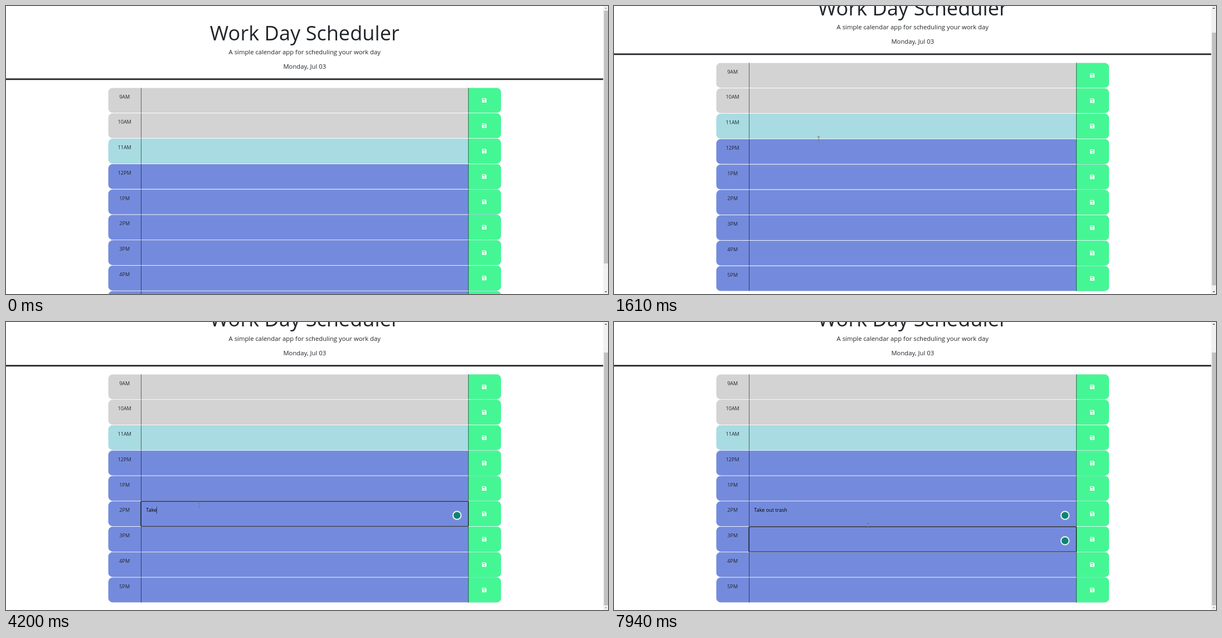
Write an HTML page with a canvas that moves like this. It is 1080 px wide and 519 px high and loops after 8 s.

```html
<!DOCTYPE html>
<html lang="en">
<head>
<meta charset="utf-8">
<title>Work Day Scheduler</title>
<style>
  html, body { margin: 0; width: 100%; height: 100%; overflow: hidden; background: #fff; }
  canvas { display: block; }
</style>
</head>
<body>
<canvas id="stage" width="1080" height="519"></canvas>
<script>
const ctx = document.getElementById('stage').getContext('2d');

// The page is laid out 1912 pixels wide and scaled down to the stage
const PAGE_WIDTH = 1912, SCALE = 1080 / PAGE_WIDTH, VIEW_HEIGHT = 519 / SCALE;
const LOOP = 8000, MAX_SCROLL = 94;
const BAR = 15, BAR_X = PAGE_WIDTH - BAR, CENTER = BAR_X / 2;

const INK = '#212529', GREEN = '#45f794';
const PAST = '#d3d3d3', PRESENT = '#a8dce2', FUTURE = '#748bdd';

const HOURS = ['9AM', '10AM', '11AM', '12PM', '1PM', '2PM', '3PM', '4PM', '5PM'];
const GRID_TOP = 261, GRID_WIDTH = 1248, ROW_HEIGHT = 80;
const LEFT = CENTER - GRID_WIDTH / 2, COLUMN = GRID_WIDTH / 12;
const FIELD_X = LEFT + COLUMN, BUTTON_X = LEFT + 11 * COLUMN;
const TEXT_X = FIELD_X + 16.5, BASELINE = 34;

const ENTRY = 'Take out trash';
const FIRST_KEY = 3580, KEY_GAP = 180;
const FIRST_FOCUS = 3170, SECOND_FOCUS = 7170, BLINK = 530;

// The pointer glides to each stop: departure time, x, y
const GLIDE = 350;
const STOPS = [
  [300, 1055, 424], [980, 657, 425], [1400, 645, 425], [2200, 548, 549],
  [2550, 513, 625], [2960, 613, 585], [6680, 806, 699], [7240, 806, 649]
];

const progress = (t, start, duration) => Math.min(1, Math.max(0, (t - start) / duration));
const smooth = p => p * p * (3 - 2 * p);
const rowY = index => GRID_TOP + index * (ROW_HEIGHT + 1);

function rect(x, y, w, h, color) {
  ctx.fillStyle = color;
  ctx.fillRect(x, y, w, h);
}

function circle(x, y, r, color) {
  ctx.fillStyle = color;
  ctx.beginPath();
  ctx.arc(x, y, r, 0, 7);
  ctx.fill();
}

function polygon(color, ...points) {
  ctx.fillStyle = color;
  ctx.beginPath();
  points.forEach(([x, y]) => ctx.lineTo(x, y));
  ctx.closePath();
  ctx.fill();
}

function text(str, x, y, size, align = 'center', color = INK) {
  ctx.font = `${size}px "Open Sans", sans-serif`;
  ctx.textAlign = align;
  ctx.fillStyle = color;
  ctx.fillText(str, x, y);
}

function drawHeader() {
  text('Work Day Scheduler', CENTER, 109, 64);
  text('A simple calendar app for scheduling your work day', CENTER, 153.5, 20);
  text('Monday, Jul 03', CENTER, 199.5, 20);
  rect(0, 231, BAR_X, 5, INK);
}

function drawSaveIcon(x, y) {
  polygon('#fff', [x, y], [x + 11, y], [x + 14, y + 3], [x + 14, y + 14], [x, y + 14]);
  rect(x + 2, y + 2, 7.5, 3.5, GREEN);
  circle(x + 7, y + 10, 2, GREEN);
}

function drawRow(label, index) {
  const y = rowY(index);
  ctx.save();
  ctx.beginPath();
  ctx.roundRect(LEFT, y, GRID_WIDTH, ROW_HEIGHT, 15);
  ctx.clip();
  rect(LEFT, y, GRID_WIDTH, ROW_HEIGHT, index < 2 ? PAST : index === 2 ? PRESENT : FUTURE);
  rect(BUTTON_X, y, COLUMN, ROW_HEIGHT, GREEN);
  ctx.restore();
  for (const x of [FIELD_X, BUTTON_X]) rect(x, y, 1, ROW_HEIGHT, '#000');
  text(label, LEFT + COLUMN / 2, y + BASELINE, 16);
  drawSaveIcon(BUTTON_X + 43.5, y + 33);
}

function drawFocus(index, caretX, sinceInput) {
  const y = rowY(index);
  ctx.strokeStyle = '#101010';
  ctx.lineWidth = 2;
  ctx.beginPath();
  ctx.roundRect(FIELD_X, y, 10 * COLUMN, ROW_HEIGHT, 2);
  ctx.stroke();
  if (sinceInput % (2 * BLINK) < BLINK) rect(caretX, y + 17, 1, 22, '#000');
}

function drawBadge(index) {
  circle(1432.5, rowY(index) + 45, 14.5, '#f4f6f8');
  circle(1432.5, rowY(index) + 45, 11, '#0b8573');
}

function drawEntry(t) {
  if (t < FIRST_FOCUS) return;
  const typedCount = Math.floor((t - FIRST_KEY) / KEY_GAP) + 1;
  const typed = ENTRY.slice(0, Math.max(0, typedCount));
  text(typed, TEXT_X, rowY(5) + BASELINE, 16, 'left', '#000');
  drawBadge(5);
  if (t < SECOND_FOCUS) {
    const lastKey = FIRST_KEY + (typed.length - 1) * KEY_GAP;
    drawFocus(5, TEXT_X + ctx.measureText(typed).width, t - (typed ? lastKey : FIRST_FOCUS));
  } else {
    drawFocus(6, TEXT_X, t - SECOND_FOCUS);
    drawBadge(6);
  }
}

function drawScrollbar(scroll) {
  const ratio = (VIEW_HEIGHT - 2 * BAR) / (VIEW_HEIGHT + MAX_SCROLL);
  const arrow = (y, dir, active) => polygon(active ? '#505050' : '#a3a3a3',
    [BAR_X + 4, y], [BAR_X + 12, y], [BAR_X + 8, y + 4 * dir]);
  rect(BAR_X, 0, BAR, VIEW_HEIGHT, '#f1f1f1');
  rect(BAR_X + 2, BAR + scroll * ratio, BAR - 2, VIEW_HEIGHT * ratio, '#c1c1c1');
  arrow(9, -1, scroll > 0);
  arrow(VIEW_HEIGHT - 9, 1, scroll < MAX_SCROLL);
}

function pointerAt(t) {
  let x = 1820, y = 878;
  for (const [start, toX, toY] of STOPS) {
    const p = progress(t, start, GLIDE);
    x += (toX - x) * p;
    y += (toY - y) * p;
  }
  return [x, y];
}

function drawPointer(t) {
  if (t < STOPS[0][0]) return;
  const [x, y] = pointerAt(t);
  ctx.save();
  ctx.translate(x, y);
  if (x > BUTTON_X) {
    const arrow = new Path2D('M0 0V16L4 13L6 18L9 17L6 12H11Z');
    ctx.fillStyle = '#fff';
    ctx.fill(arrow);
    ctx.stroke(arrow);
  } else {
    // Inverts whatever lies below it
    ctx.globalCompositeOperation = 'difference';
    ctx.strokeStyle = '#fff';
    ctx.lineWidth = 1;
    ctx.stroke(new Path2D('M-4 -7.5H4M0 -7V7M-4 7.5H4'));
  }
  ctx.restore();
}

function draw(now) {
  const t = now % LOOP;
  const scroll = MAX_SCROLL * smooth(progress(t, 1400, 280));
  ctx.setTransform(SCALE, 0, 0, SCALE, 0, 0);
  rect(0, 0, PAGE_WIDTH, VIEW_HEIGHT, '#fff');
  ctx.save();
  ctx.translate(0, -scroll);
  drawHeader();
  HOURS.forEach(drawRow);
  drawEntry(t);
  ctx.restore();
  drawScrollbar(scroll);
  drawPointer(t);
  requestAnimationFrame(draw);
}
requestAnimationFrame(draw);
</script>
</body>
</html>
```
